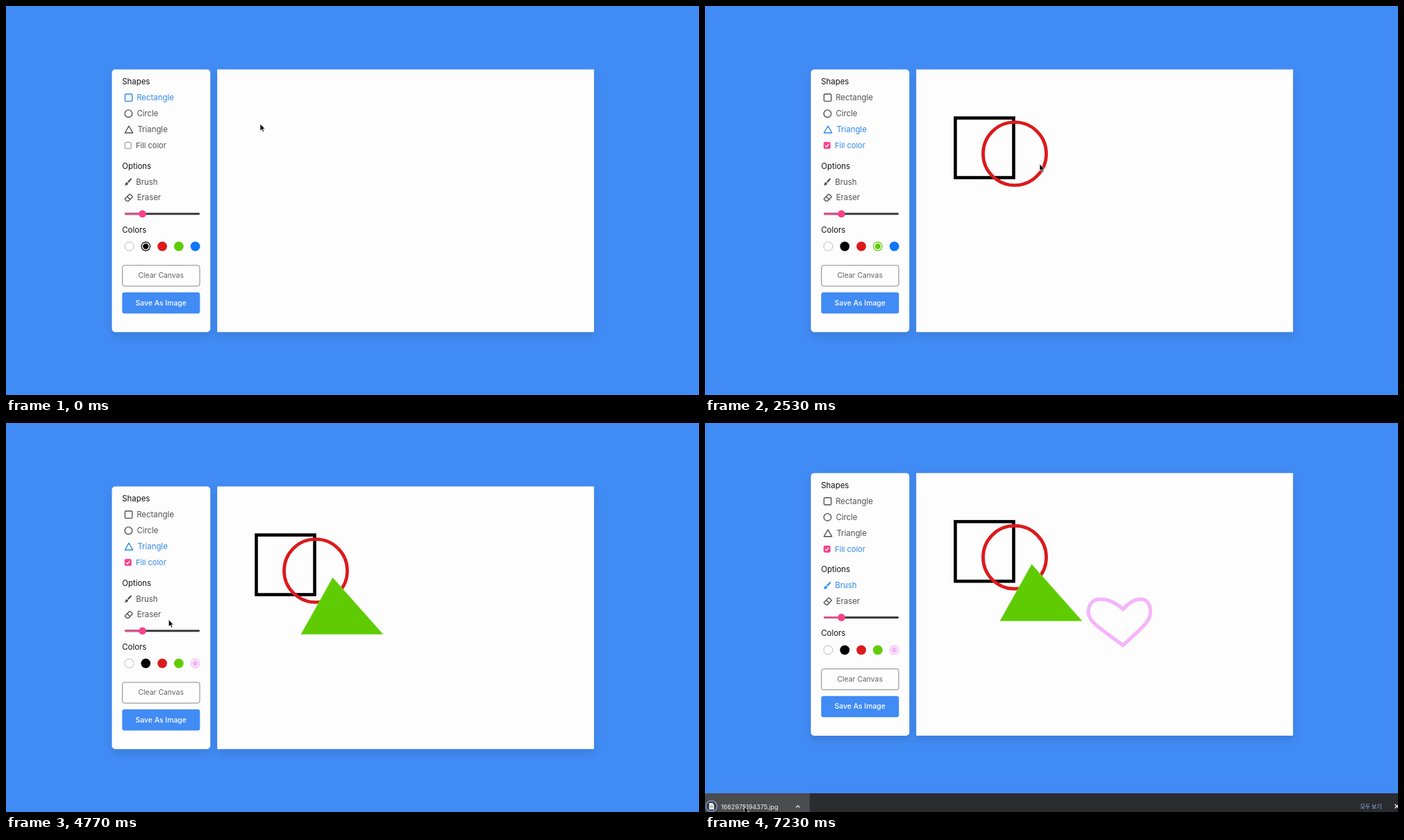
An HTML page that plays this animation: 998 by 561 pixels, repeating every 7260 ms.

```html
<!DOCTYPE html>
<html lang="en">
<head>
<meta charset="utf-8">
<title>Drawing app</title>
<style>
  html, body { margin: 0; width: 100%; height: 100%; overflow: hidden; background: #418bf5; }
  svg { display: block; width: 100vw; height: 100vh; }
  text { font-family: Inter, "Open Sans", sans-serif; font-size: 11.4px; }
  .button { font-size: 10.4px; text-anchor: middle; }
  .picker text { font: 9.4px "Liberation Sans", Arial, sans-serif; text-anchor: middle; }
  .line { fill: none; stroke: currentColor; stroke-width: 1.35; stroke-linejoin: round; }
  .shelf .file { font-size: 9px; }
  .shelf .all { font: 8px "Noto Sans CJK KR", "Noto Sans CJK", sans-serif; }
</style>
</head>
<body>
<svg viewBox="0 0 998 561" xmlns="http://www.w3.org/2000/svg">
  <defs>
    <filter id="cardShadow" x="-20%" y="-20%" width="140%" height="140%">
      <feDropShadow dx="0" dy="6" stdDeviation="6" flood-opacity=".11"/>
    </filter>
    <filter id="popShadow" x="-20%" y="-20%" width="140%" height="140%">
      <feDropShadow dx="0" dy="2" stdDeviation="3" flood-opacity=".4"/>
    </filter>
    <linearGradient id="toWhite"><stop stop-color="#fff"/><stop offset="1" stop-color="#fff" stop-opacity="0"/></linearGradient>
    <linearGradient id="toBlack" x2="0" y2="1"><stop stop-opacity="0"/><stop offset="1"/></linearGradient>
    <linearGradient id="hues"></linearGradient>
  </defs>
  <rect width="998" height="561" fill="#418bf5"/>

  <g id="page">
    <g fill="#fdfdfd" filter="url(#cardShadow)">
      <rect x="152.5" y="91.5" width="141.7" height="378.7" rx="4.7"/>
      <rect x="304.2" y="91.5" width="542.6" height="378.7"/>
    </g>

    <g fill="#111">
      <text x="167.3" y="113.4">Shapes</text>
      <text x="167.3" y="234.6">Options</text>
      <text x="167.3" y="326.8">Colors</text>
    </g>
    <g id="rectangle">
      <rect class="line" x="171.4" y="127" width="10.3" height="10.3" rx="1.2"/>
      <text x="188.2" y="136.2" fill="currentColor">Rectangle</text>
    </g>
    <g id="circle">
      <circle class="line" cx="176.4" cy="155.2" r="5.3"/>
      <text x="188.4" y="159.2" fill="currentColor">Circle</text>
    </g>
    <g id="triangle">
      <path class="line" d="M177 173.2 182.7 183H171.3Z"/>
      <text x="189.4" y="182.2" fill="currentColor">Triangle</text>
    </g>
    <g id="fillColor">
      <rect id="box" x="171.2" y="196.6" width="9" height="9" rx="1.4"/>
      <path id="tick" d="m173.2 201.2 1.8 1.9 3.3-4.1" fill="none" stroke="#fff" stroke-width="1.4"/>
      <text x="187" y="205" fill="currentColor" style="font-size:11px">Fill color</text>
    </g>
    <g id="brush">
      <path fill="currentColor" d="M180.8 248.6q.7.6-.1 1.7l-4 4.7-1.9-1.7 4.6-4.5q.8-.7 1.4-.2ZM174 254l2 1.9q.2 2.7-5.3 3.1 1.2-1 1.2-2.6.2-2 2.1-2.4Z"/>
      <text x="187.2" y="257.6" fill="currentColor">Brush</text>
    </g>
    <g color="#4f5054">
      <path class="line" d="m171.6 277.7 6-6q.7-.6 1.4 0l2.8 2.8q.6.7 0 1.4l-5.4 5.4h-2.4l-2.4-2.3q-.5-.7 0-1.3Zm2.9-2.9 4.3 4.1"/>
      <text x="188.7" y="280.4" fill="currentColor">Eraser</text>
    </g>

    <rect x="171" y="298.3" width="108" height="2.9" rx="1.4" fill="#3a3a3c"/>
    <rect x="171" y="298.3" width="26" height="2.9" rx="1.4" fill="#d4588c"/>
    <circle cx="196.5" cy="299.7" r="5.3" fill="#f8408c"/>
    <g id="swatches"></g>

    <rect x="167.7" y="374" width="111.3" height="30" rx="3" fill="none" stroke="#85868a"/>
    <text class="button" x="223.2" y="392.2" fill="#606266">Clear Canvas</text>
    <rect x="167.3" y="413" width="112" height="30.5" rx="3.2" fill="#418bf5"/>
    <text class="button" x="223.2" y="431.6" fill="#fff" font-weight="500">Save As Image</text>

    <rect id="square" x="360.5" y="161.5" fill="none" stroke="#000" stroke-width="4.6"/>
    <circle id="ring" cx="446" cy="213" fill="none" stroke="#db1a1c" stroke-width="4.7"/>
    <path id="wedge" fill="#5fcc03" stroke="#8bdc4c" stroke-width=".6"/>
    <path id="heart" fill="none" stroke="#f4b5fa" stroke-width="5.2" stroke-linejoin="round" stroke-linecap="round" pathLength="1"/>
  </g>

  <g id="picker" class="picker">
    <rect x="266" y="355.5" width="157.5" height="169.5" fill="#fff" filter="url(#popShadow)"/>
    <rect id="pure" x="266.5" y="356" width="156.5" height="92.5"/>
    <rect x="266.5" y="356" width="156.5" height="92.5" fill="url(#toWhite)"/>
    <rect x="266.5" y="356" width="156.5" height="92.5" fill="url(#toBlack)"/>
    <g id="spot" fill="none"><circle r="4.5" stroke="#000" stroke-width="2"/><circle r="3.4" stroke="#fff"/></g>
    <path d="m276 468 .6-2.2 4.4-4.4 1.8 1.8-4.4 4.4Z" fill="none" stroke="#222" stroke-width="1.2"/>
    <path d="m280.3 460.4 3.8 3.8M282 462.5l2-2" stroke="#222" stroke-width="2.2" stroke-linecap="round"/>
    <circle id="preview" cx="305" cy="464" r="10.5" stroke="#0002" stroke-width=".7"/>
    <rect x="325" y="459.6" width="88" height="7.9" fill="url(#hues)"/>
    <circle id="knob" cy="463.6" r="4.8" stroke="#fff" stroke-width="1.6"/>
    <g id="channels"></g>
    <path d="m398.3 510.7 1.7-1.9 1.7 1.9m-3.4 2.6 1.7 1.9 1.7-1.9" fill="none" stroke="#333" stroke-width=".9"/>
  </g>

  <g id="shelf" class="shelf">
    <rect y="534" width="998" height="40" fill="#2b2c30"/>
    <rect y="534" width="149.5" height="40" fill="#4b4c50"/>
    <path d="M150 534v40" stroke="#606166"/>
    <circle cx="9.3" cy="552.7" r="8" fill="#38404d" stroke="#7f9dc5" stroke-width="1.4"/>
    <path d="M6 548h4.500l2.500 2.500v7H6Z" fill="#e9ebee"/>
    <path d="M7.5 552h4m-4 2h4" stroke="#7b8088" stroke-width=".8"/>
    <text class="file" x="23" y="556.6" fill="#f1f1f2">1662975194375.jpg</text>
    <path d="m131 554.5 2.7-2.7 2.7 2.7" fill="none" stroke="#e4e5e7" stroke-width="1.3"/>
    <text class="all" x="943.5" y="555.6" fill="#8ab4f8">모두 보기</text>
    <path d="m993.5 550 5.5 5.5m0-5.5-5.5 5.5" stroke="#f0f0f0" stroke-width="1.3"/>
  </g>

  <path id="cursor" d="M0 0V10l2.3-2.1 1.6 3.7 1.7-.7-1.6-3.6H7Z" fill="#000" stroke="#fff" stroke-width=".7"/>
</svg>
<script>
const LOOP = 7260;
const $ = id => document.getElementById(id);
const clamp = (v, low = 0, high = 1) => Math.max(low, Math.min(high, v));
const ease = v => (v = clamp(v), v * v * (3 - 2 * v));
const mix = (a, b, k) => a + (b - a) * k;
const set = (el, attrs) => { for (const k in attrs) el.setAttribute(k, attrs[k]); return el; };
const add = (parent, tag, attrs) =>
  parent.appendChild(set(document.createElementNS('http://www.w3.org/2000/svg', tag), attrs));
const show = (el, on) => set(el, { visibility: on ? 'visible' : 'hidden' });

const TOOLS = ['rectangle', 'circle', 'triangle', 'brush'];
const COLORS = ['#fff', '#000', '#db1a1c', '#5fcc03', '#0f76fa'];
const ACCENT = '#2f88e6', INK = '#4f5054', PINK = '#f8408c', PICKED = '#f4b5fa';

const swatchAt = i => [177.5 + 23.78 * i, 346.6];
const optionAt = row => [206, 134 + 23 * row];
const CORNER = [360.5, 161.5], CENTER = [446, 213], APEX = [470.5, 223], HEART = [602, 340];
const away = ([x, y], dx, dy) => [x + dx, y + dy];

// The pointer's route: it reaches each stop at a time and rests there for a while.
const stops = [];
const at = {};
function go(name, time, point, rest = 0) {
  stops.push({ time, point, leave: time + rest });
  at[name] = time;
}
go('start', 0, [366, 170]);
go('squareFrom', 110, CORNER);
go('squareTo', 560, away(CORNER, 84, 86), 200);
go('circle', 930, optionAt(1));
go('red', 1080, swatchAt(2));
go('ringFrom', 1230, CENTER);
go('ringTo', 1515, away(CENTER, 36.5, 27.2), 160);
go('triangle', 1920, optionAt(2), 250);
go('fill', 2290, optionAt(3));
go('green', 2410, swatchAt(3));
go('aim', 2530, [482, 228]);
go('wedgeFrom', 2620, APEX);
go('wedgeTo', 3100, away(APEX, 72.5, 81.7), 150);
go('rest', 3370, [538, 299], 100);
go('custom', 3900, swatchAt(4));
go('hueFrom', 4020, [360.7, 464]);
go('hueTo', 4120, [340.8, 464], 20);
go('shade', 4330, [323.5, 373]);
go('pale', 4520, [310, 358], 80);
go('brush', 4860, optionAt(5.3));
go('heartFrom', 5180, HEART);
go('notch', 5630, away(HEART, 0, -52));
go('heartTo', 6250, HEART, 40);
go('save', 6520, [225, 430], 300);
go('file', 7210, [56.5, 553]);
const PICKER_OPEN = at.custom + 20, PICKER_CLOSE = 4640, SHELF_OPEN = 6760;

const between = (t, from, to) => ease((t - at[from]) / (at[to] - at[from]));
const during = (t, from, to) => pointer(clamp(t, at[from], at[to]));

// One lobe, in parts of its width, swept from tip to notch; the right lobe mirrors it.
const LOBE = [[0, 340], [.64, 316], [1, 306], [1, 292], [1, 280], [.85, 273.5], [.66, 273.5], [.38, 273.5], [.15, 281], [0, 288]];
const lobe = (width, points) => points.map(([u, y]) => [HEART[0] + width * u, y]);
const left = lobe(-50, LOBE), right = lobe(39.5, [...LOBE].reverse());
const heart = set($('heart'), { d: `M${left[0]}C${left.slice(1).join(' ')} ${right.slice(1).join(' ')}` });
const heartLength = heart.getTotalLength();
const heartDrawn = t => mix(.535 * between(t, 'heartFrom', 'notch'), 1, between(t, 'notch', 'heartTo'));

function pointer(t) {
  if (t > at.heartFrom && t < at.heartTo) {
    const p = heart.getPointAtLength(heartDrawn(t) * heartLength);
    return [p.x, p.y];
  }
  const next = stops.findIndex(s => s.time > t);
  if (next < 0) return stops[stops.length - 1].point;
  const from = stops[next - 1], to = stops[next];
  const k = ease((t - from.leave) / (to.time - from.leave));
  return from.point.map((v, i) => mix(v, to.point[i], k));
}

function hsv(h, s, v) {
  const channel = n => {
    const k = (n + h / 60) % 6;
    return Math.round(255 * v * (1 - s * clamp(Math.min(k, 4 - k))));
  };
  return [channel(5), channel(3), channel(1)];
}
const rgb = c => `rgb(${c})`;

for (let i = 0; i <= 6; i++) add($('hues'), 'stop', { offset: i / 6, 'stop-color': rgb(hsv(360 - i * 60, 1, .97)) });

const swatches = COLORS.map((fill, i) => {
  const [cx, cy] = swatchAt(i);
  return {
    disc: add($('swatches'), 'circle', { cx, cy, r: i ? 6.9 : 6.5, fill, stroke: i ? 'none' : '#bcbcbf' }),
    gap: add($('swatches'), 'circle', { cx, cy, r: 4.9, fill: 'none', stroke: '#fff', 'stroke-width': 1.5 })
  };
});
const channels = ['R', 'G', 'B'].map((name, i) => {
  const x = 299.5 + i * 40;
  add($('channels'), 'rect', { x: x - 17.5, y: 479.5, width: 35, height: 21.5, rx: 1, fill: '#fff', stroke: '#d9d9db' });
  add($('channels'), 'text', { x: 301 + i * 38.7, y: 515.2 }).textContent = name;
  return add($('channels'), 'text', { x, y: 493.5 });
});

function drawPanel(t) {
  const tool = TOOLS.filter(id => t >= (at[id] || 0)).pop();
  for (const id of TOOLS) set($(id), { color: id === tool ? ACCENT : INK });
  const filled = t >= at.fill;
  set($('fillColor'), { color: filled ? ACCENT : INK });
  set($('box'), { fill: filled ? PINK : '#fff', stroke: filled ? PINK : '#858589' });
  show($('tick'), filled);
  const picked = 1 + ['red', 'green', 'custom'].filter(name => t >= at[name]).length;
  swatches.forEach((s, i) => show(s.gap, i === picked));
  set(swatches[4].disc, { fill: t < PICKER_CLOSE ? COLORS[4] : PICKED });
}

function drawShapes(t) {
  const [sx, sy] = during(t, 'squareFrom', 'squareTo');
  set($('square'), { width: sx - CORNER[0], height: sy - CORNER[1] });
  show($('square'), t > at.squareFrom);

  const [rx, ry] = during(t, 'ringFrom', 'ringTo');
  set($('ring'), { r: Math.hypot(rx - CENTER[0], ry - CENTER[1]) });
  show($('ring'), t > at.ringFrom);

  const [wx, wy] = during(t, 'wedgeFrom', 'wedgeTo');
  set($('wedge'), { d: `M${APEX}L${wx} ${wy}H${APEX[0] - (wx - APEX[0]) * .63}Z` });
  show($('wedge'), t > at.wedgeFrom);

  set(heart, { 'stroke-dasharray': `${heartDrawn(t)} 2` });
  show(heart, t > at.heartFrom);
}

function drawPicker(t) {
  const open = t >= PICKER_OPEN && t < PICKER_CLOSE;
  show($('picker'), open);
  if (!open) return;
  const hueX = during(t, 'hueFrom', 'hueTo')[0];
  const [x, y] = t < at.shade - 100 ? [413, 360] : pointer(Math.min(t, at.pale));
  const hue = 360 * (1 - (hueX - 325) / 88);
  const s = clamp((x - 265.5) / 156.5), v = clamp(1 - (y - 356.5) / 92.5);
  set($('pure'), { fill: rgb(hsv(hue, 1, .97)) });
  set($('knob'), { cx: hueX, fill: rgb(hsv(hue, 1, .97)) });
  set($('spot'), { transform: `translate(${x + 1} ${y})` });
  set($('preview'), { fill: rgb(hsv(hue, clamp(s * 1.15), v * .97)) });
  hsv(hue, s, v).forEach((value, i) => { channels[i].textContent = value; });
}

function render(t) {
  drawPanel(t);
  drawShapes(t);
  drawPicker(t);
  const rise = ease((t - SHELF_OPEN) / 220);
  set($('page'), { transform: `translate(0 ${-19.3 * rise})` });
  set($('shelf'), { transform: `translate(0 ${28 * (1 - rise)})` });
  set($('cursor'), { transform: `translate(${pointer(t).join(' ')})` });
}

const start = performance.now();
function tick() {
  render((performance.now() - start) % LOOP);
  requestAnimationFrame(tick);
}
tick();
</script>
</body>
</html>
```
